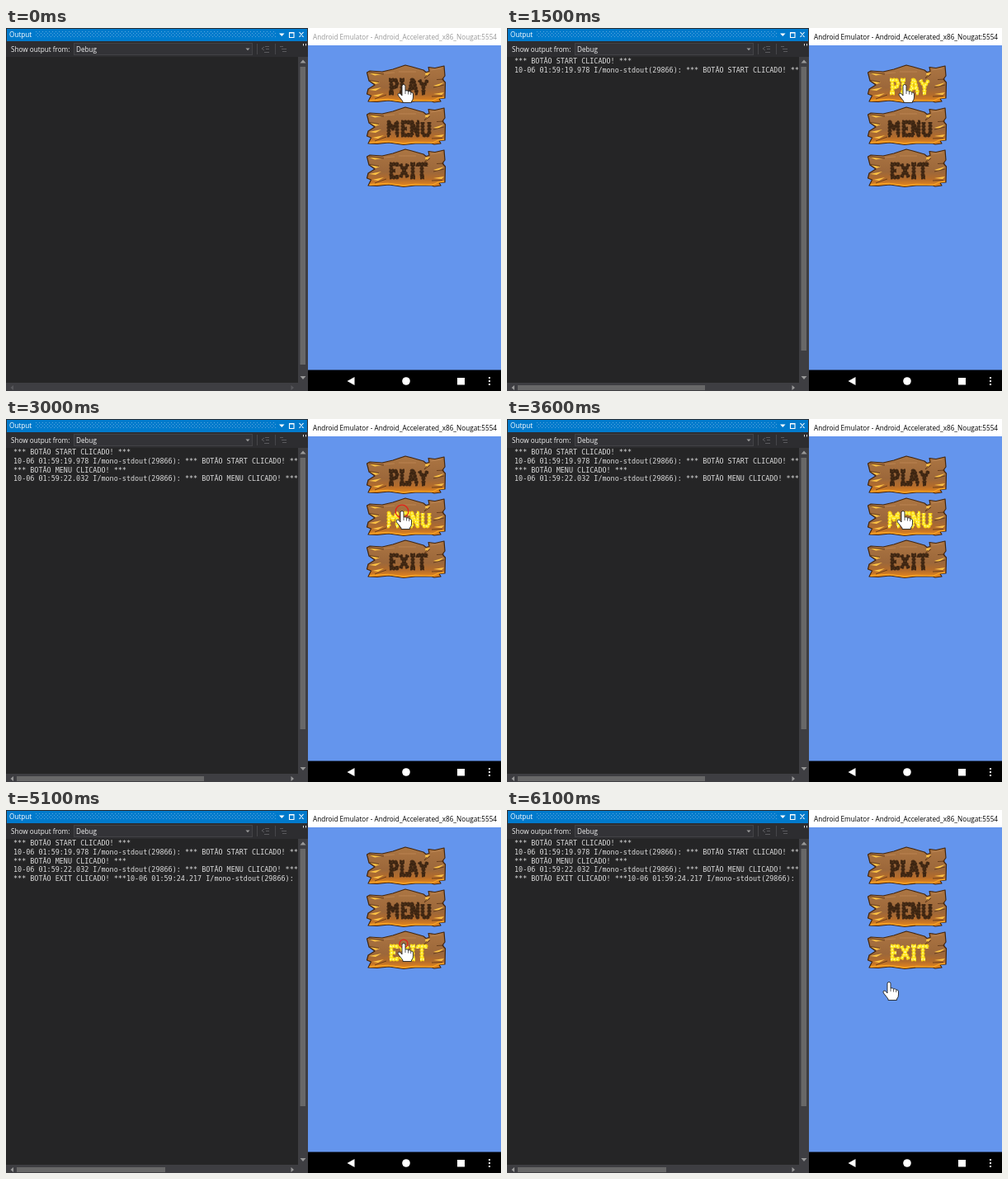
An HTML page that plays this animation: 600x440 px, repeating every 6.2 s.

```html
<!DOCTYPE html>
<html lang="pt">
<head>
<meta charset="utf-8">
<title>Output</title>
<style>
html, body { margin: 0; width: 100%; height: 100%; overflow: hidden; background: #252526; }
svg { display: block; width: 600px; height: 440px; }
text { white-space: pre; }
.ui { font: 8.2px "Open Sans", "Noto Sans", sans-serif; }
.log { font: 8.43px "DejaVu Sans Mono", "Noto Sans Mono", monospace; fill: #dcdcdc; }
.letters path { fill: none; stroke-linejoin: round; }
</style>
</head>
<body>
<svg viewBox="0 0 600 440">
  <defs>
    <linearGradient id="wood" x1="0" y1="0" x2="0" y2="1">
      <stop offset="0" stop-color="#ac7643"/>
      <stop offset=".6" stop-color="#9c673a"/>
      <stop offset=".8" stop-color="#b46c2b"/>
      <stop offset="1" stop-color="#ee8a1a"/>
    </linearGradient>
    <pattern id="grip" x="36" y="4" width="4" height="4" patternUnits="userSpaceOnUse">
      <path d="M0 0h1v1h-1zM2 2h1v1h-1z" fill="#59a8de"/>
    </pattern>
    <clipPath id="page"><rect x="0" y="35" width="354" height="395"/></clipPath>
    <g id="board">
      <path d="M1.500 10L5 8L20 9L33 6L48 1L56 3L70 7L73 9.500L77 8.500L76 3.500L84 4.500L95 2L96 14L93 18L96.500 22L96 41L89 41.500L91 45L83 46L80 45L60 45L46 46.500L28 44L14 45.500L3 45L6.500 38L1.500 36L3 30L11 25L4 20Z" fill="url(#wood)" stroke="#43260f" stroke-width="1.200" stroke-linejoin="round"/>
      <path d="M4.500 44L14 43L27 42.500L46 45L60 43.500L81 44L88 41L95 40" fill="none" stroke="#f7a423" stroke-width="1.300"/>
      <path d="M4 10.500L20 12L11 13.500ZM5.500 20L17 22L12 24ZM4 31L19 28L12 32ZM8 38L22 35L15 39ZM72 11L78 10L73 15ZM95 22L82 26L88 27ZM95 34L82 36L92 37Z" fill="#ffc545"/>
      <path d="M4 10L22 12M5 19.500L16 21.500M74 13L71 17L78 12M95 18L86 18.500M95 25L82 28M25 37L11 42M80 39L93 38.500" fill="none" stroke="#5a3315" stroke-width=".8"/>
      <path d="M40 9L61 9M79 7L92 5M22 11L35 10" fill="none" stroke="#be8753" stroke-width=".8"/>
    </g>
  </defs>

  <!-- output panel -->
  <rect width="366" height="440" fill="#2d2d30"/>
  <rect x="1" y="1" width="364" height="15" fill="#007acc"/>
  <rect x="36" y="4" width="291" height="8" fill="url(#grip)"/>
  <text class="ui" x="4" y="11.300" fill="#fff">Output</text>
  <path d="M331 6.500h6.500l-3.250 3.500z" fill="#fff"/>
  <path d="M343.500 5.500h5.500v6h-5.500zM343 6h6.500M355.500 5l5 6M360.500 5l-5 6" fill="none" stroke="#fff" stroke-width="1.100"/>
  <text class="ui" x="6" y="28.900" fill="#f1f1f1">Show output from:</text>
  <rect x="82.500" y="18.500" width="216" height="14" fill="#333337" stroke="#434346"/>
  <text class="ui" x="85" y="28.900" fill="#f1f1f1">Debug</text>
  <path d="M290.500 24.500h5l-2.500 2.800z" fill="#999"/>
  <path d="M304.500 19v13M326.500 19v13" stroke="#46464a"/>
  <path d="M314 22.500h5M315 25.500h4M313 29.500h6M313 23l-3 2 3 2M332 22.500h4M334 25.500h6M335 28.500h5" fill="none" stroke="#5a5a5e"/>
  <path d="M360.500 19v2.500M363.500 19v2.500" stroke="#ddd"/>
  <rect y="35" width="354" height="395" fill="#252526"/>
  <path d="M354 35h12v405H0v-10h354z" fill="#3e3e42"/>
  <path d="M356.500 42.500h7l-3.500-4zM356.500 422h7l-3.500 4z" fill="#999"/>
  <path id="sideArrows" d="M9 433v6l-3.500-3zM345.500 433v6l3.500-3z"/>
  <rect id="vBar" x="356.500" y="47" width="6.500" fill="#686868"/>
  <rect id="hBar" x="13" y="433" height="6" fill="#686868"/>
  <g id="log" class="log" clip-path="url(#page)"></g>

  <!-- emulator -->
  <rect x="366" width="234" height="21" fill="#fff"/>
  <text id="caption" class="ui" x="372" y="13.900">Android Emulator - Android_Accelerated_x86_Nougat:5554</text>
  <rect x="366" y="21" width="234" height="394" fill="#6495ed"/>
  <rect x="366" y="414.500" width="234" height="25.500" fill="#000"/>
  <path d="M422.500 423v10l-9-5zM547 424h9v8.500h-9z" fill="#fff"/>
  <circle cx="485" cy="428" r="4.800" fill="#fff"/>
  <path d="M585 423h2v2h-2zM585 427h2v2h-2zM585 431h2v2h-2z" fill="#fff"/>
  <g id="signs"></g>
  <circle id="ring" fill="none" stroke="#e3201b" stroke-width="1.200"/>
  <g id="hand" stroke="#222" stroke-width=".9" stroke-linejoin="round">
    <path d="M-2 1.500Q-2-.5 0-.5Q2-.5 2 1.500V7Q5 6 5.500 8Q8 7 8.800 9Q11.500 8.500 11.500 11V15Q11.500 18 9.500 20V21.500H-1V20L-6.500 13Q-8 10.500-6 10Q-4 9.500-2 13Z" fill="#fff"/>
    <path d="M2 7v4M5.500 8v3.500M8.700 9v3" fill="none" stroke-width=".7"/>
  </g>
</svg>
<script>
const LOOP = 6200, STEP = 100;
const NS = "http://www.w3.org/2000/svg";
const $ = id => document.getElementById(id);

function add(parent, tag, attrs) {
  const el = document.createElementNS(NS, tag);
  for (const k in attrs) el.setAttribute(k, attrs[k]);
  return parent.appendChild(el);
}

// Centre lines of the carved letters, 16 units high
const GLYPH = {
  P: "M3 0V16M0 16H6M0 0H8L10 3V6L8 9H3",
  L: "M3 0V16M0 0H6M0 16H9V12",
  A: "M1 16L4 0H6L10 16M3 10H8M0 16H3M8 16H11",
  Y: "M0 0L5 8L10 0M5 8V16M3 16H7",
  M: "M2 16V0L7 8L12 0V16M0 16H3M11 16H14",
  E: "M2 0V16M0 0H9V3M2 8H7M0 16H9V13",
  N: "M2 16V0L9 16V0M0 16H3M8 0H11",
  U: "M1 0V13L3 16H7L9 13V0",
  X: "M1 0L10 16M10 0L1 16",
  I: "M3 0V16M0 0H6M0 16H6",
  T: "M5 0V16M3 16H8M0 3V0H10V3"
};

const SIGNS = [
  { word: "PLAY", y: 44, at: [464, 477, 488, 501], lit: [600, 2700] },
  { word: "MENU", y: 95, at: [462, 479, 490, 504], lit: [2700, 4800] },
  { word: "EXIT", y: 146, at: [465, 477, 490, 499], lit: [4800, LOOP] }
];

for (const s of SIGNS) {
  add($("signs"), "use", { href: "#board", x: 436, y: s.y });
  const g = add($("signs"), "g", { class: "letters", role: "img", "aria-label": s.word });
  const layer = (width, dash) => {
    const group = add(g, "g", { "stroke-width": width, "stroke-dasharray": dash });
    [...s.word].forEach((c, i) => add(group, "path", {
      d: GLYPH[c], transform: `translate(${s.at[i]} ${s.y + 19})`
    }));
    return group;
  };
  s.layers = [layer(5, "2.4 1.5"), layer(3.3, "none"), layer(1.3, "1.2 2.6")];
}
const DARK = ["#51311a", "#3b2411", "#55361b"];
const LIT = ["#f2bd10", "#ffe820", "#fffbc0"];

const TAG = " I/mono-stdout(29866): ";
const msg = name => `*** BOTÃO ${name} CLICADO! ***`;
const LINES = [
  [600, msg("START")],
  [600, "10-06 01:59:19.978" + TAG + msg("START")],
  [2700, msg("MENU")],
  [2700, "10-06 01:59:22.032" + TAG + msg("MENU")],
  [4800, msg("EXIT") + "10-06 01:59:24.217" + TAG + msg("EXIT")]
].map(([from, s], i) => {
  const el = add($("log"), "text", { x: 9, y: 42.8 + i * 10.85 });
  el.textContent = s;
  return { from, el };
});

// start time, vertical thumb height, horizontal thumb width
const BARS = [[0, 361, 0], [600, 344, 227], [2700, 329, 227], [4800, 312, 180]];

// start, end, from, to
const MOVES = [
  [1500, 2100, [482, 69], [480, 112]],
  [3600, 4200, [480, 112], [482, 162]],
  [5700, 6100, [482, 162], [463, 209]]
];

// press time, radius lost per ms
const CLICKS = [[200, .02], [2200, .0115], [4400, .0172]];

function handAt(t) {
  let p = MOVES[0][2];
  for (const [a, b, from, to] of MOVES) {
    if (t < a) break;
    const u = Math.min(1, (t - a) / (b - a));
    const e = u * u * (3 - 2 * u);
    p = from.map((v, i) => v + (to[i] - v) * e);
  }
  return p;
}

function ringAt(t) {
  for (const [start, rate] of CLICKS) {
    const r = 17 - (t - start) * rate;
    if (t >= start && r > 1 && t < start + 1300) return r;
  }
  return 0;
}

function draw(now) {
  const t = Math.floor(now % LOOP / STEP) * STEP;
  for (const s of SIGNS) {
    const on = t >= s.lit[0] && t < s.lit[1];
    s.layers.forEach((l, i) => l.setAttribute("stroke", (on ? LIT : DARK)[i]));
  }
  for (const l of LINES) l.el.setAttribute("visibility", t >= l.from ? "inherit" : "hidden");
  const [, tall, wide] = BARS.filter(b => t >= b[0]).pop();
  $("vBar").setAttribute("height", tall);
  $("hBar").setAttribute("width", wide);
  $("sideArrows").setAttribute("fill", wide ? "#999" : "#58585c");
  $("caption").setAttribute("fill", t >= 400 ? "#000" : "#999");
  const [x, y] = handAt(t);
  $("hand").setAttribute("transform", `translate(${x} ${y})`);
  $("ring").setAttribute("cx", x);
  $("ring").setAttribute("cy", y);
  $("ring").setAttribute("r", ringAt(t));
}

const begin = performance.now();
function tick() {
  draw(performance.now() - begin);
  requestAnimationFrame(tick);
}
tick();
</script>
</body>
</html>
```
